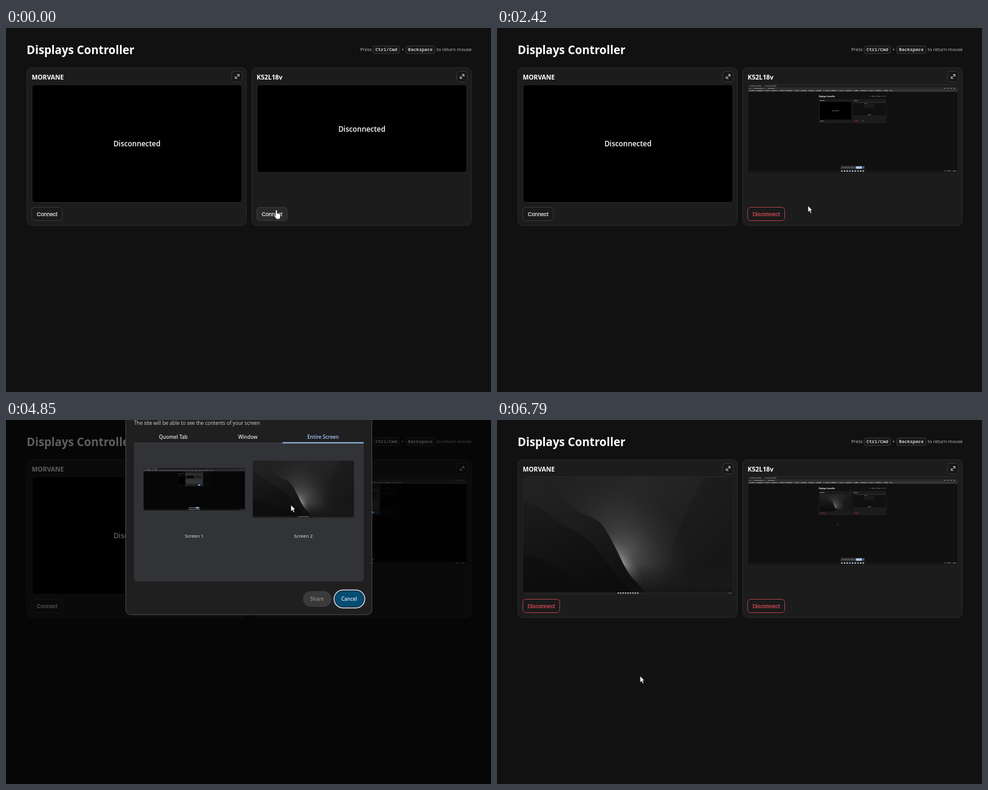
Recreate the animation shown at these times as an HTML page. Size 800 px wide and 600 px high, loop 6850 ms.

```html
<!DOCTYPE html>
<html lang="en">
<head>
<meta charset="utf-8">
<title>Displays Controller</title>
<style>
  html, body { margin: 0; width: 100%; height: 100%; overflow: hidden; background: #111; }
  svg { position: absolute; left: 0; top: 0; width: 800px; height: 600px; }
  text { font-family: "Open Sans", "Noto Sans", sans-serif; white-space: pre; }
  .mono { font-family: "Noto Sans Mono", "DejaVu Sans Mono", monospace; }
  .btn { font-family: "Liberation Sans", Arial, sans-serif; }
  #dialog { overflow: visible; transform-origin: 401px 210px; }
</style>
</head>
<body>
<svg id="main" viewBox="0 0 800 600"></svg>
<svg id="dialog" viewBox="0 0 800 600"></svg>
<svg id="top" viewBox="0 0 800 600"></svg>
<script>
const LOOP = 6850;
const $ = id => document.getElementById(id);

// ---- markup helpers ----
const rect = (x, y, w, h, fill, extra = '') =>
  `<rect x="${x}" y="${y}" width="${w}" height="${h}" fill="${fill}" ${extra}/>`;
const box = (x, y, w, h, r, fill, stroke, sw = 1) =>
  rect(x, y, w, h, fill, `rx="${r}" stroke="${stroke}" stroke-width="${sw}"`);
const text = (x, y, size, str, fill = '#fff', extra = '') =>
  `<text x="${x}" y="${y}" font-size="${size}" fill="${fill}" ${extra}>${str}</text>`;
const mid = 'text-anchor="middle"';
const semi = 'font-weight="600"';
const group = (id, body, extra = '') => `<g id="${id}" ${extra}>${body}</g>`;
const use = (id, transform = '', extra = '') => `<use href="#${id}" transform="${transform}" ${extra}/>`;
const dashes = (x1, x2, y, color, pattern, w = 1) =>
  `<path d="M${x1} ${y}H${x2}" stroke="${color}" stroke-width="${w}" stroke-dasharray="${pattern}"/>`;

// ---- page ----
function button(id, x, w, label, color, border) {
  return group(id,
    box(x + .5, 295.5, w, 22, 5, '#1a1a1a', border) +
    text(x + .5 + w / 2, 309.5, 9.1, label, color,
      `${mid} class="btn" stroke="${color}" stroke-width=".3"`));
}

function card(n, x, name, screenH) {
  const ex = x + 338;
  return box(x + .5, 65.5, 362, 260, 8, '#1c1c1c', '#2b2b2b') +
    text(x + 8.5, 84.7, 10.4, name, '#fff', 'font-weight="700"') +
    box(ex + .5, 71.5, 17.5, 17.5, 4.5, '#171717', '#383838') +
    `<path d="M${ex + 6.2} 83l6.2-6.2m-3.4-.1h3.5v3.5m-6.4-.6v3.5h3.5" fill="none" stroke="#eee" stroke-width=".9"/>` +
    box(x + 9, 93.5, 346, screenH, 5, '#000', '#2a2a2a') +
    group('off' + n, text(x + 182, 94 + screenH / 2 + 4.3, 11.9, 'Disconnected', '#fff', `${mid} ${semi}`)) +
    group('live' + n, n === 1 ? use('wall', 'translate(43 94)') : tinyMirror()) +
    button('con' + n, x + 8, 50.5, 'Connect', '#ddd', '#393939') +
    button('dis' + n, x + 8, 61, 'Disconnect', '#cb4854', '#b0424e');
}

function tinyMirror() {
  return rect(414, 94, 345, 144, '#101010') + rect(414, 94, 345, 10, '#303030') +
    rect(531, 116, 54, 40, '#1c1c1c') + rect(587, 116, 54, 40, '#1c1c1c') +
    rect(531, 110, 28, 4, '#888') + rect(567, 227, 38, 6, '#444') + rect(567, 235, 38, 2, '#aaa');
}

const page = group('page',
  rect(0, 0, 800, 600, '#111') +
  text(34, 42.9, 18.8, 'Displays Controller', '#fff', 'font-weight="700"') +
  text(584.3, 38.2, 7.55, 'Press', '#c4c4c4') +
  box(605.5, 29.5, 43.5, 12.5, 3, '#171717', '#3a3a3a') +
  text(627.3, 38.2, 7.55, 'Ctrl/Cmd', '#ccc', `${mid} ${semi} class="mono"`) +
  text(654.3, 38.2, 7.55, '+', '#c4c4c4', mid) +
  box(659.5, 29.5, 48, 12.5, 3, '#171717', '#3a3a3a') +
  text(683.5, 38.2, 7.55, 'Backspace', '#ccc', `${mid} ${semi} class="mono"`) +
  text(710.3, 38.2, 7.6, 'to return mouse', '#c4c4c4') +
  card(1, 34, 'MORVANE', 194) +
  card(2, 405, 'K52L18v', 144.5));

// ---- wallpaper, 346 x 194 ----
const stop = (o, c, a = 1) => `<stop offset="${o}" stop-color="${c}" stop-opacity="${a}"/>`;
const radial = (id, transform, stops) =>
  `<radialGradient id="${id}" gradientUnits="userSpaceOnUse" cx="0" cy="0" r="1" gradientTransform="${transform}">${stops}</radialGradient>`;
const wall = `<defs>
  <linearGradient id="sky" x2="1" y2=".5">${stop(0, '#1e1e1e')}${stop(.45, '#272727')}${stop(.8, '#1f1f1f')}${stop(1, '#191919')}</linearGradient>
  ${radial('halo', 'translate(172 122) rotate(60) scale(125 95)', stop(0, '#666', .75) + stop(.4, '#484848', .5) + stop(1, '#2a2a2a', 0))}
  ${radial('streak', 'translate(165 141) rotate(61) scale(62 22)', stop(0, '#a0a0a0', .8) + stop(.5, '#787878', .4) + stop(1, '#505050', 0))}
  <linearGradient id="hill" x2=".6" y2="1">${stop(0, '#232323')}${stop(.5, '#1c1c1c')}${stop(1, '#101010')}</linearGradient>
  <linearGradient id="near" x2=".5" y2="1">${stop(0, '#1c1c1c')}${stop(1, '#0c0c0c')}</linearGradient>
  <linearGradient id="floor" x2="0" y2="1">${stop(0, '#1a1a1a', 0)}${stop(.6, '#1a1a1a', .7)}${stop(1, '#141414', .95)}</linearGradient>
  <clipPath id="wallClip"><rect width="346" height="194" rx="4"/></clipPath></defs>` +
  group('wall',
    rect(0, 0, 346, 194, 'url(#sky)') +
    '<path d="M300 0H346V194H225Q245 90 300 0Z" fill="#161616" opacity=".35"/>' +
    rect(0, 0, 346, 194, 'url(#halo)') +
    rect(0, 0, 346, 194, 'url(#streak)') +
    rect(130, 145, 216, 49, 'url(#floor)') +
    '<path d="M0 2C18 2 34 2 46 14C62 30 72 44 92 57C106 64 118 66 128 76C142 92 154 121 168 148Q176 164 188 174L204 194H0Z" fill="url(#hill)"/>' +
    '<path d="M0 40C20 44 38 56 52 70C72 84 94 90 110 106C132 128 146 156 180 190L182 194H0Z" fill="url(#near)"/>' +
    '<path d="M0 128Q38 132 70 160T120 194H0Z" fill="#0d0d0d" opacity=".6"/>' +
    rect(0, 190, 346, 4, '#202020') +
    dashes(156, 191, 191.3, '#bbb', '2.4 1.6', 2) + dashes(339, 344, 191.3, '#888', '1.5 1'),
    'clip-path="url(#wallClip)"');

// ---- the wide desktop that mirrors the page ----
const MINI = 'translate(525.9 107.7) scale(.151)';
const miniDialog = group('miniDialog',
  rect(556, 106, 61, 50.2, '#202021', 'rx="1"') + rect(558, 113.4, 57, 34.5, '#333438') +
  rect(559, 115, 27.5, 23, '#1d1d1d', 'id="miniPick"') +
  rect(560, 119.5, 25.5, 10.5, '#080808') + rect(587.4, 117.8, 25.2, 14, '#222') +
  rect(600, 150.2, 7, 4, '#a8c7fa', 'rx="2"') + rect(608, 150.2, 7, 4, '#075078', 'rx="2"'));
const browserBar =
  rect(414, 94, 345.5, 3.4, '#1d1d1d') + rect(414, 97.4, 345.5, 4, '#2c2c2c') + rect(414, 101.4, 345.5, 3.8, '#363636') +
  dashes(416, 466, 95.6, '#888', '2 1 7 1 9 5') + dashes(416, 458, 99.5, '#999', '2 2 1 3 14 1', .9) +
  dashes(738, 757, 99.5, '#999', '2 3', 1) +
  dashes(416, 652, 103.2, '#aaa', '1.5 1 6 2 1 1 9 3', 1) +
  dashes(423, 640, 103.2, '#c05050', '2 29', 1.2) + dashes(436, 600, 103.2, '#6a9be0', '2 37', 1.2);
const taskBar =
  rect(414, 234, 345.5, 4, '#151515') +
  dashes(567.5, 606, 235.7, '#d0d0d0', '2.6 1.8', 2) + dashes(567.5, 606, 235.7, '#4d8fd0', '2.6 10.6', 2) +
  dashes(738, 758, 235.7, '#999', '1.5 3 4 1', 1);
const desk = group('desk',
  rect(414, 94, 345.5, 144.5, '#101010') +
  use('page', MINI) +
  rect(526, 157, 121, 42, '#101010') +
  rect(414, 94, 345.5, 144, '#000', 'id="miniDim"') +
  miniDialog +
  use('arrow', '', 'id="miniArrow"') +
  browserBar + taskBar +
  group('shareBar', rect(566.5, 227, 40, 6, '#2d2e31', 'rx="1"') +
    dashes(569, 590, 230, '#999', '3 1 5 1', .8) + rect(591.5, 228, 11, 4, '#a8c7fa', 'rx="2"') +
    rect(604, 229.3, 1.4, 1.4, '#a8c7fa')));

const arrowShape = '<path id="arrow" d="M0 0V10.6L2.4 8.4 4.2 12.4 6 11.6 4.3 7.7H7.4Z" fill="#fff" stroke="#111" stroke-width=".7"/>';
$('main').innerHTML =
  `<defs>${wall}${arrowShape}${desk}</defs>${page}` +
  `<g id="mirror">${use('desk')}</g>` + rect(0, 0, 800, 600, '#000', 'id="dim"');

// ---- share picker ----
const pickCard = (n, x) => group('pick' + n, box(x, 46.8, 181, 153, 8, '#064c72', '#d0d8f2', 1.5));
const pickLabel = (n, x) => text(x, 193.8, 7.8, 'Screen ' + n, '#e8e8e8', `${mid} id="label${n}"`);
const pill = (x, fill, id) => rect(x, 282, 47, 26, fill, `rx="13" id="${id}"`);
$('dialog').innerHTML =
  box(197.5, -90, 406, 411, 8, '#1f1f20', '#48494b') +
  text(211, 8, 8.25, 'The site will be able to see the contents of your screen', '#d4d4d4') +
  text(276, 30.6, 8.2, 'Quomel Tab', '#dedede', `${mid} ${semi}`) +
  text(399, 30.6, 8.2, 'Window', '#dedede', `${mid} ${semi}`) +
  text(523, 30.6, 8.2, 'Entire Screen', '#a8c7fa', `${mid} ${semi}`) +
  '<path d="M211 38H590V261Q590 266 585 266H216Q211 266 211 261Z" fill="#323337"/>' +
  rect(211, 37.5, 379, 1, '#47484b') + rect(456, 36.6, 134, 1.8, '#a0c4f8') +
  pickCard(1, 220.2) + pickCard(2, 400.2) +
  use('desk', 'translate(227 79) scale(.4836) translate(-414 -94)') +
  use('wall', 'translate(407 67) scale(.4827)') +
  pickLabel(1, 310.5) + pickLabel(2, 490.5) +
  pill(490, '#3a3a3b', 'share') + text(513, 298, 8.2, 'Share', '#8a8a8a', `${mid} ${semi} id="shareText"`) +
  group('ring', box(541.2, 280.2, 50.6, 29.6, 14.8, '#1f1f20', '#cbdcf5', 1.6)) +
  pill(543, '#064c72', 'cancel') + text(566, 298, 8.2, 'Cancel', '#dbe8fb', `${mid} ${semi}`);

$('top').innerHTML = group('cursor', use('arrow', '', 'id="pointer"') +
  '<path id="hand" d="M-1.3 1.3A1.3 1.3 0 0 1 1.3 1.3V5.4L5.4 6.4Q7 6.9 6.8 8.6L6.3 12.2 5.4 15H.2L-3 10.6Q-3.8 9.3-2.9 8.7-2 8.3-1.3 9.3Z" fill="#fff" stroke="#111" stroke-width=".6"/>');

// ---- motion ----
const SESSIONS = [
  { open: 30, pick: 1000, close: 1840, choice: 1 },
  { open: 3940, pick: 4900, close: 6100, choice: 2 }
];
const LIVE = { 1: 6260, 2: 2000 };
const PATH = [
  [0, 446, 300], [240, 446, 301], [320, 446, 301], [900, 322, 132], [1210, 318, 128],
  [1520, 318, 128], [1720, 508, 289], [2200, 508, 289], [2400, 513, 293], [2510, 513, 293],
  [2850, 330, 396], [2910, 328, 398], [3520, 80, 309], [3790, 68, 303], [3940, 68, 303],
  [4080, 70, 313], [4300, 70, 313], [4850, 470, 140], [5200, 480, 135], [5330, 480, 135],
  [5640, 514, 302], [6210, 514, 302], [6760, 236, 422], [LOOP, 236, 422]
];
const clamp = v => Math.min(1, Math.max(0, v));
const smooth = v => v * v * (3 - 2 * v);
const show = (id, on) => { $(id).style.display = on ? '' : 'none'; };
const attr = (id, name, value) => $(id).setAttribute(name, value);

function cursorAt(t) {
  const i = PATH.findIndex((p, k) => k > 0 && t <= p[0]);
  const [a, b] = [PATH[i - 1], PATH[i]];
  const e = smooth((t - a[0]) / (b[0] - a[0]));
  return [a[1] + (b[1] - a[1]) * e, a[2] + (b[2] - a[2]) * e];
}

function drawDialog(t) {
  const s = SESSIONS.find(s => t >= s.open && t < s.close + 150);
  const age = s ? t - s.open : 0;
  const gone = s ? clamp((t - s.close) / 110) : 1;
  const seen = s ? (1 - (1 - clamp((age - 100) / 110)) ** 2) * (1 - gone * gone) : 0;
  const dim = s ? clamp(age / 110) * (1 - clamp((t - s.close - 20) / 120)) : 0;
  const choice = s && t >= s.pick ? s.choice : 0;

  // tilted toward the viewer at the bottom until it settles
  const r = 1 - seen;
  $('dialog').style.opacity = seen;
  show('dialog', seen > 0);
  $('dialog').style.transform = r
    ? `matrix3d(${1 + .085 * r},0,0,0, 0,${1 + .181 * r},0,${-3.77e-4 * r}, 0,0,1,0, 0,0,0,1)` : 'none';
  attr('dim', 'opacity', .63 * dim);

  for (const n of [1, 2]) {
    show('pick' + n, choice === n);
    attr('label' + n, 'font-weight', choice === n ? 700 : 400);
  }
  show('ring', !choice);
  attr('share', 'fill', choice ? '#a3bcea' : '#3a3a3b');
  attr('shareText', 'fill', choice ? '#0b2b4c' : '#8a8a8a');

  const echo = s && age > 300 && !gone;
  show('miniDialog', echo);
  attr('miniDim', 'opacity', s && age > 200 && !gone ? .63 : 0);
  attr('miniPick', 'fill', choice ? '#075078' : '#333438');
  attr('miniPick', 'x', choice === 2 ? 586.3 : 559);
}

function render(t) {
  for (const n of [1, 2]) {
    const live = t >= LIVE[n];
    show('off' + n, !live);
    show('con' + n, !live);
    show('live' + n, live);
    show('dis' + n, live);
  }
  show('mirror', t >= LIVE[2]);
  show('shareBar', t >= LIVE[2]);
  drawDialog(t);

  const [x, y] = cursorAt(t);
  const over2 = t < 200, over1 = t > 3540 && t < 4110;
  $('con1').firstChild.setAttribute('fill', over1 ? '#2a2a2a' : '#1a1a1a');
  $('con2').firstChild.setAttribute('fill', over2 ? '#2a2a2a' : '#1a1a1a');
  show('hand', over1 || over2);
  show('pointer', !(over1 || over2));
  attr('cursor', 'transform', `translate(${x} ${y})`);
  attr('miniArrow', 'transform', `${MINI} translate(${x} ${y})`);
}

const start = performance.now();
function tick() {
  render((performance.now() - start) % LOOP);
  requestAnimationFrame(tick);
}
tick();
</script>
</body>
</html>
```
